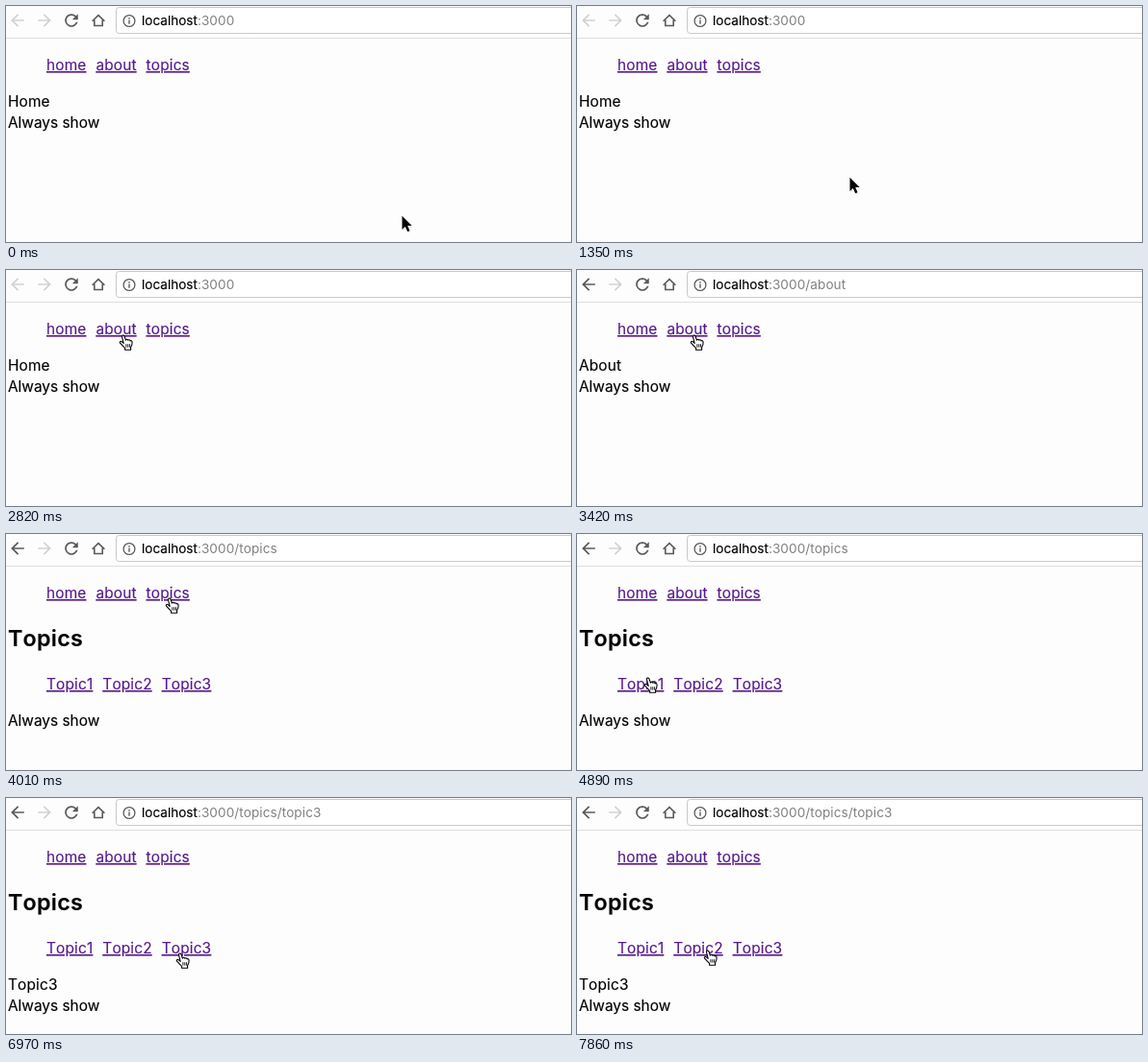
An HTML page that plays this animation: 587x246 px, repeating every 8 s.

```html
<!DOCTYPE html>
<html lang="en">
<head>
<meta charset="utf-8">
<title>Nested routes</title>
<style>
  html, body { margin: 0; width: 100%; height: 100%; overflow: hidden; background: #fdfdfd; }
  svg { display: block; }
  text { font: 15.4px Inter, sans-serif; white-space: pre; stroke: #000; stroke-width: .15; }
  .link, .heading, #view { font-kerning: none; letter-spacing: .01em; }
  .link { fill: #551a8b; stroke: #551a8b; text-decoration: underline; text-decoration-skip-ink: none; }
  .heading { font-size: 23.3px; font-weight: 600; }
  .url { font-size: 13.55px; }
  #path { fill: #808080; stroke: none; letter-spacing: .1px; }
  .icon { fill: #5a5a5a; }
  .line { fill: none; stroke: #5a5a5a; }
</style>
</head>
<body>
<svg width="587" height="246" viewBox="0 0 587 246">
  <defs>
    <path id="left" d="M20 11H7.8l5.6-5.6L12 4l-8 8 8 8 1.4-1.4L7.8 13H20z"/>
    <path id="tip" d="M.5 .8V15l3.3-3 2.4 5.3 2.3-1-2.3-5.2h4.5z"/>
  </defs>

  <path d="M0 33.5H587" stroke="#dedede"/>
  <rect x="114.5" y="1.5" width="490" height="27" rx="3" fill="#fff" stroke="#c8c8c8"/>

  <use id="back" href="#left" class="icon" transform="translate(1.8 4.8) scale(.85)"/>
  <use href="#left" fill="#d2d2d2" transform="translate(50.2 4.8) scale(-.85 .85)"/>
  <path id="reload" class="icon" transform="translate(57.8 4.8) scale(.85)"
    d="M17.65 6.35A8 8 0 1 0 19.73 14h-2.08A6 6 0 1 1 16.22 7.78L13 11h7V4z"/>
  <path id="stop" class="line" stroke-width="1.8" d="M63 10l10 10M73 10l-10 10"/>
  <path class="line" stroke-width="1.6" d="M89.6 15.8L96 9.6l6.4 6.2M91.8 14.5v6h8.4v-6"/>
  <circle class="line" cx="128" cy="15.5" r="5.9" stroke-width="1.3"/>
  <path class="line" stroke-width="1.4" d="M128 12v1.5M128 14.6v4.2"/>
  <text class="url" x="141" y="20.3">localhost<tspan id="path"></tspan></text>

  <g id="nav"></g>
  <g id="topics">
    <text class="heading" x="2" y="117">Topics</text>
  </g>
  <text id="view" x="2"></text>
  <text id="always" x="2">Always show</text>

  <g id="arrow">
    <use href="#tip" opacity=".2" x=".5" y="1.2"/>
    <use href="#tip" stroke="#fff" stroke-width="1.6" paint-order="stroke"/>
  </g>
  <g id="hand" fill="#fff" stroke="#000" stroke-width="1.1" stroke-linejoin="round">
    <path d="M5.2 9.4L3.6 3.2C3 1 5.2 .2 6 2l1.4 4.2c.4-1.2 2-1.2 2.4 .1c.6-1 2-.7 2.3 .6c.7-.7 1.9-.2 2 1.1c.2 2.5-.7 4.4-1.5 5.6v2.7H6.6v-1.9C5 13 3.2 11 1.6 9.2C.6 8 2.2 6.8 3.4 7.8z"/>
    <path stroke-width=".9" d="M7.9 10.2v3.4M9.8 10.2v3.4M11.6 10.2v3.4"/>
  </g>
</svg>
<script>
const LOOP = 8000;
const STEP = 147; // the pointer advances once per step
const $ = id => document.getElementById(id);

// Time of each click and the path it opens
const routes = [
  [0, ''], [3120, '/about'], [4010, '/topics'],
  [5180, '/topics/topic1'], [5920, '/topics/topic2'], [6970, '/topics/topic3']
];

// Pointer moves: start time, number of steps, destination x, y
const moves = [
  [0, 1, 411, 218],
  [1350, 2, 240, 165],
  [1790, 4, 215, 132],
  [2380, 4, 121, 68],
  [3560, 2, 169, 67],
  [4300, 7, 65, 157],
  [5480, 2, 113, 158],
  [6370, 2, 180, 162],
  [7560, 3, 135, 159]
];

const easeOut = u => 1 - (1 - u) ** 2;
const show = (id, on) => $(id).setAttribute('display', on ? 'inline' : 'none');

// Lays links out in a row and returns a hit test for it
function linkRow(group, labels, baseline) {
  let x = 42;
  const spans = labels.map(label => {
    group.insertAdjacentHTML('beforeend', `<text class="link" x="${x}" y="${baseline}">${label}</text>`);
    const left = x, right = x + group.lastElementChild.getComputedTextLength();
    x = right + 10;
    return [left, right];
  });
  return (px, py) => py > baseline - 15 && py < baseline + 5 &&
    spans.some(([left, right]) => px >= left && px <= right);
}

function pointerAt(t) {
  const index = moves.findLastIndex(([start]) => start <= t);
  const [start, steps, x, y] = moves[index];
  const [, , fromX, fromY] = moves[Math.max(index - 1, 0)];
  const step = Math.min(Math.floor((t - start) / STEP) + 1, steps);
  const u = easeOut(step / steps);
  return [fromX + (x - fromX) * u, fromY + (y - fromY) * u].map(Math.round);
}

const overNav = linkRow($('nav'), ['home', 'about', 'topics'], 67);
const overTopics = linkRow($('topics'), ['Topic1', 'Topic2', 'Topic3'], 162);

function render(t) {
  const path = routes.findLast(([time]) => time <= t)[1];
  const inTopics = path.startsWith('/topics');
  const page = path.split('/').pop() || 'home';
  const hasView = page !== 'topics';
  const viewY = inTopics ? 200 : 105;
  const loading = t >= 600 && t < 900;

  $('path').textContent = ':3000' + path;
  $('back').style.fill = path ? '' : '#d2d2d2';
  show('stop', loading);
  show('reload', !loading);

  show('topics', inTopics);
  $('view').textContent = hasView ? page[0].toUpperCase() + page.slice(1) : '';
  $('view').setAttribute('y', viewY);
  $('always').setAttribute('y', hasView ? viewY + 22 : viewY);

  const [x, y] = pointerAt(t);
  const overLink = overNav(x, y) || inTopics && overTopics(x, y);
  show('hand', overLink);
  show('arrow', !overLink);
  $('hand').setAttribute('transform', `translate(${x - 4} ${y - 1})`);
  $('arrow').setAttribute('transform', `translate(${x} ${y})`);
}

const start = performance.now();
function tick() {
  render((performance.now() - start) % LOOP);
  requestAnimationFrame(tick);
}
tick();
</script>
</body>
</html>
```
